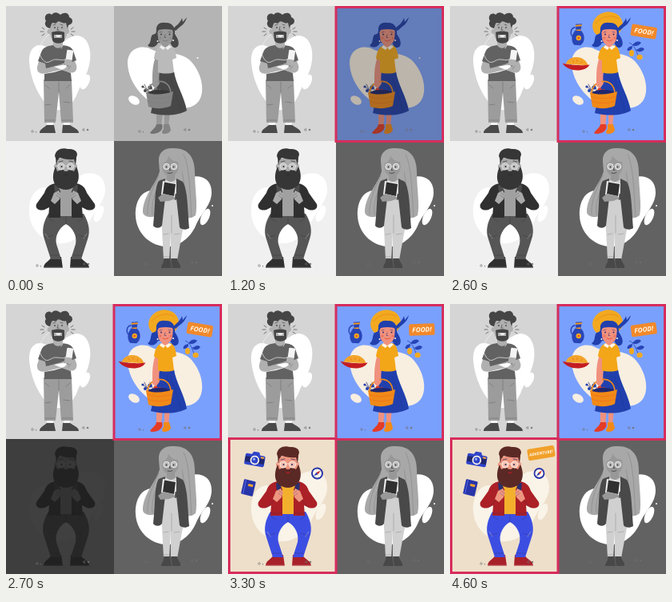
These frames come from a looping animation (270 px wide and 338 px high, 4.7 s). An HTML page:

```html
<!DOCTYPE html>
<html lang="en">
<head>
<meta charset="utf-8">
<title>Personas</title>
<style>
html,body{margin:0;width:100%;height:100%;overflow:hidden;background:#aaa}
svg{display:block;width:100vw;height:100vh}
.bg{fill:var(--bg)}.blob{fill:var(--blob)}.sk{fill:var(--sk)}.hr{fill:var(--hr)}
.sh{fill:var(--sh)}.bk{fill:var(--bk)}.so{fill:var(--so)}.jk{fill:var(--jk)}
.pt{fill:var(--pt)}.st{fill:var(--st)}.ck{fill:var(--ck)}.dk{fill:var(--dk)}.wh{fill:var(--wh)}
.l{fill:none;stroke:var(--dk);stroke-width:.7;stroke-linecap:round;stroke-linejoin:round}
.lb{stroke:var(--bk)}.lw{stroke:var(--wh)}.lo{stroke:var(--so)}
.tag{font-family:"Noto Sans","Open Sans",sans-serif;font-weight:600;font-style:italic;fill:#fff8ea;text-anchor:middle}
</style>
</head>
<body>
<svg viewBox="0 0 270 338" preserveAspectRatio="none">
<defs>
 <g id="splash">
  <path d="M0 50C-1 31 8 17 22 18C38 20 50 12 62 4C76-4 95 0 95 20C95 36 83 45 76 60C69 78 52 90 36 88C16 86 1 70 0 50Z"/>
  <ellipse cx="87" cy="51" rx="5" ry="11" transform="rotate(24 87 51)"/>
 </g>
</defs>

<!-- music fan -->
<g id="music">
 <path class="bg" d="M0 0H135V169H0Z"/>
 <path class="blob" d="M29 70C28 53 38 45 50 51C66 59 72 38 89 37C104 38 108 58 104 74C100 90 94 98 90 107C84 124 74 132 62 130C45 124 31 96 29 70Z"/>
 <ellipse class="blob" cx="99" cy="95" rx="5" ry="10" transform="rotate(25 99 95)"/>
 <path class="wh" d="M51 144H59V152H51ZM72 144H80V152H72Z"/>
 <path class="ck" d="M47 92H82L84 146H69L66 108L62 146H48Z"/>
 <path class="l" d="M66 95V108M49 99L54 103M80 99L75 103M49 124L56 123M72 120L80 121M49 143H61M70 143H83" opacity=".5"/>
 <path class="dk" d="M42 159C42 154 47 153 51 149H60L62 159ZM91 159C91 154 85 153 80 149H71L70 159Z"/>
 <path class="sk" d="M59 40H71V52C67 56 62 56 59 52Z"/>
 <path class="sk" d="M42 66L39 76C38 84 44 86 51 84L72 79C77 77 77 72 73 73L53 77L50 69ZM85 66L88 74C90 82 84 85 78 83L60 76C56 73 59 69 63 70L79 75Z"/>
 <path class="jk" d="M59 49C51 50 46 52 44 58L40 69L49 72L50 78L72 72L78 76L80 71L88 68L84 56C82 51 77 50 71 49C68 54 62 54 59 49ZM48 85L60 83L70 80L81 84L82 94H48Z"/>
 <path class="sk" d="M72 74L74 66L79 63L83 67L81 75Z"/>
 <path class="l" d="M53 77L73 73M81 75L78 79" opacity=".5"/>
 <rect class="wh" x="75.5" y="55" width="8" height="12" rx="1.2" transform="rotate(8 79 61)"/>
 <path class="l lw" d="M54 35C41 47 39 57 45 66C52 76 56 66 63 67C69 67 71 69 76 66M76 35C76 44 72 47 69 53"/>
 <path class="sk" d="M55 20H76V36C75 43 71 45 66 45C59 45 56 41 55 35C51 36 50 28 55 29ZM76 28C80 28 80 35 76 35Z"/>
 <path class="hr" d="M55 28C48 27 48 20 50 19C46 12 53 7 57 11C61 6 66 9 68 11C73 7 79 9 79 14C85 16 84 23 78 24L77 29L75 21C71 23 68 18 64 20C62 24 59 19 57 22Z"/>
 <path class="hr" fill-rule="evenodd" d="M57 33C62 31 69 31 73 33V43C71 48 60 48 58 43ZM60 36V40H70V36Z"/>
 <path class="wh" d="M62 36.5H69Q68 39 65.5 39Q63 39 62 36.5Z"/>
 <path class="l" d="M59 24L62 23M68 23L71 24M65 26L64 30H66"/>
 <g class="dk"><circle cx="61" cy="27" r=".9"/><circle cx="70" cy="27" r=".9"/></g>
 <path class="l" d="M48 29L45 27M47 32L43 32M48 35L45 37M81 29L84 27M82 32L86 32M81 35L84 37"/>
</g>

<!-- food lover -->
<g id="food">
 <path class="bg" d="M135 0H270V169H135Z"/>
 <path class="blob" d="M152 72C152 53 169 48 181 54C195 62 215 55 230 68C244 82 250 106 241 119C231 132 215 127 200 127C176 124 153 98 152 72Z"/>
 <ellipse class="blob" cx="160" cy="118" rx="7.5" ry="5" transform="rotate(32 160 118)"/>
 <circle class="blob" cx="239.5" cy="65" r="1"/>
 <g id="hat"><ellipse rx="19" ry="16.5" transform="rotate(-14)" fill="#f3a91f"/><path d="M-15-2C-9-11 6-14 14-8" stroke="#e28a1b" fill="none" stroke-width=".8"/></g>
 <path class="hr" d="M188 31C187 23 193 20 199 21C207 20 212 26 211 35C215 41 217 46 215 50C212 54 207 52 206 47L190 46C188 51 181 54 177 49C182 47 180 39 183 36C186 35 188 35 188 31Z"/>
 <path class="hr" d="M209 29C212 24 217 23 220 15L221 20L226 14C224 23 218 25 212 31Z"/>
 <path class="sk" d="M188 132L196 131L194 152H188ZM198 132H205L203 151H198Z"/>
 <path class="so" d="M180 159C183 154 187 153 188 148H195C197 153 194 157 189 159Q182 161 180 159Z"/>
 <path class="bk" d="M197 148H204L206 155Q205 160 197 160Q193 159 197 154Z"/>
 <path class="hr" d="M190 82H210C212 97 224 116 226 131C217 136 201 139 181 134C185 119 185 98 190 82Z"/>
 <path class="l" d="M206 91C209 106 217 119 218 132M201 90L203 105" opacity=".3"/>
 <path class="sk" d="M188 62C183 72 183 84 183 95L187 104L192 97C190 88 193 78 195 67Z"/>
 <path class="sh" d="M195 49H205C210 50 212 56 213 65L208 67L210 83C204 85 196 85 190 83V68L185 66C186 58 188 51 195 49Z"/>
 <path class="sk" d="M195 44H203V50Q199 54 195 50Z"/>
 <path class="wh" d="M194 49L199 52L197 55L192 52ZM204 49L199 52L202 55L207 51Z"/>
 <path class="sk" d="M189 30C194 25 204 25 209 30L208 41C207 47 203 49 199 49C194 49 190 45 190 39Z"/>
 <path class="hr" d="M188 35C187 27 191 22 199 23C207 22 211 27 210 36L208 30Q199 28 191 30Z"/>
 <path class="l" d="M199 36L198 39.5H200M192 33L195 32.3M203 32.3L206 33" opacity=".7"/>
 <g id="eyes" class="dk"><circle cx="-5" r=".9"/><circle cx="5.5" r=".9"/></g>
 <path id="smile" class="l lo"/>
 <g class="so" opacity=".35"><circle cx="193" cy="40" r="1.6"/><circle cx="206" cy="40" r="1.6"/></g>
 <g class="wh"><circle cx="189.5" cy="44" r="1"/><circle cx="209" cy="43" r="1"/></g>
 <path class="l" d="M181 108L171 101M178 108L173 98M184 107L180 98M202 107L205 100"/>
 <g class="hr"><circle cx="171" cy="101" r="1.6"/><circle cx="174" cy="106" r="2"/><circle cx="180" cy="102" r="2.6"/><circle cx="197" cy="103" r="3.4"/><circle cx="204" cy="104" r="2.4"/></g>
 <g class="so"><circle cx="187" cy="105" r="2.6"/><circle cx="192" cy="106" r="2"/></g>
 <path class="dk" d="M175 109Q190 101 207 108L205 111H177Z"/>
 <path class="l lb" style="stroke-width:1.6" d="M177 109C178 91 205 88 206 109"/>
 <path class="bk" d="M175 108C185 112 198 111 209 107L206 125C198 129 186 129 178 126Z"/>
 <path class="l lo" opacity=".35" d="M176 113C186 117 198 116 208 113M177 119C187 123 198 122 207 119"/>
 <path class="sk" d="M183 94L189 93L191 98L187 103L183 100Z"/>
 <g id="jug">
  <path d="M-4-9C-11-8-10 3-5 3" fill="none" stroke="#2845b7" stroke-width="1.5"/>
  <path fill="#2845b7" d="M-4-13L4-14L3-6C9-1 10 8 4 13H-4C-9 8-8-1-3-6Z"/>
  <path fill="#f39a20" d="M-4-12L4-13V-11L-4-10ZM-3-6L3-7V-5H-3Z"/>
  <circle cx="1" cy="4" r="3.2" fill="#f3a91f"/><circle cx="1" cy="4" r="1.2" fill="#e54a30"/>
 </g>
 <g id="pie">
  <path fill="#f3a42a" d="M-13 1C-11-6-5-9 1-9C8-9 13-5 15 0Z"/>
  <path fill="#c41d22" d="M-17 0C-8 2 9 1 17-1C13 9-9 11-17 0Z"/>
  <path d="M-5-5L-3-2M1-6V-3M7-5L6-2" fill="none" stroke="#e98320"/>
 </g>
 <g id="fruit">
  <path d="M-8-10C-2-8 1 0 4 9M-4-7L4-9M0-1L9-3" stroke="#2845b7" fill="none" stroke-width=".8"/>
  <path fill="#2845b7" d="M-4-7C0-13 5-12 7-10C4-6 0-5-4-7ZM1 0C5-5 9-5 11-2C8 2 5 2 1 0ZM-4-6C-10-5-11-2-10 0C-6 0-4-2-4-6Z"/>
  <g fill="#f3a91f"><ellipse cx="-5" cy="3" rx="3" ry="4"/><ellipse cx="5" cy="8" rx="3.6" ry="3.2"/></g>
 </g>
 <g id="foodTag">
  <rect x="-16" y="-7.3" width="32" height="14.6" rx="2" fill="#f1892a"/>
  <text class="tag" y="2.9" font-size="8.2">FOOD!</text>
 </g>
</g>

<!-- traveller -->
<g id="trip">
 <path class="bg" d="M0 169H135V338H0Z"/>
 <use href="#splash" class="blob" x="29" y="209"/>
 <path class="so" d="M47 328C47 321 54 320 57 314H69L71 328ZM104 328C104 321 96 320 93 314H81L80 328Z"/>
 <path class="wh" d="M47 326.8H71V328H47ZM80 326.8H104V328H80Z" opacity=".4"/>
 <path class="pt" d="M53 260H97C103 270 106 281 102 292L94 317H81L87 298C89 288 84 278 75 273C66 278 61 288 63 298L69 317H56L48 292C44 281 47 270 53 260Z"/>
 <path class="l" d="M75 264V273M54 266L60 270M96 266L90 270M50 290L59 287M91 287L100 290M56 312H67M83 312H94" opacity=".45"/>
 <path class="l lw" d="M49 285L53 291M101 285L97 291" opacity=".5"/>
 <path class="sh" d="M64 224H86V263H64Z"/>
 <path class="jk" d="M63 222C53 223 50 228 48 234L38 248C36 254 42 257 48 255L54 252L53 265H68V232ZM87 222C96 223 99 228 101 234L111 248C113 254 107 257 101 255L95 252L96 265H82V232Z"/>
 <path class="st" d="M60 224H66L67 242H62ZM84 224H90L88 242H83Z"/>
 <path class="l" d="M48 255L60 243M101 255L90 243M54 262H67M83 262H95" opacity=".4"/>
 <path class="sk" d="M56 244L60 234L66 231L69 236L67 242L61 248ZM94 244L90 234L84 231L81 236L83 242L89 248Z"/>
 <path class="l" d="M64 234L68 237M63 237L67 240M86 234L82 237M87 237L83 240" opacity=".4"/>
 <path class="sk" d="M63 191H86V205C90 203 90 197 86 198V213H63V205C59 204 59 197 63 198Z"/>
 <path class="hr" d="M63 200C62 195 63 191 61 188C62 179 71 177 77 179C87 178 91 184 88 189C88 193 87 197 87 200L85 192C78 193 72 191 67 190L64 194Z"/>
 <path class="hr" d="M62 201L64 207C70 204 80 204 85 207L88 201C94 214 91 229 75 230C58 229 56 214 62 201Z"/>
 <path class="so" d="M72 211Q75 209.5 78 211Q75 213.5 72 211Z"/>
 <path class="sk" d="M73 200H77L78 206Q75 208 72 206Z"/>
 <g class="wh" fill-opacity=".45" style="stroke:var(--wh)"><circle cx="69" cy="201" r="4"/><circle cx="80.5" cy="201" r="4"/></g>
 <path class="l lw" d="M73 200H76.5M65 200H62M84.5 200H87"/>
 <path class="l" d="M66 195L71 194M79 194L84 195"/>
 <g class="dk"><circle cx="69.5" cy="201" r="1"/><circle cx="80" cy="201" r="1"/></g>
 <g id="camera">
  <rect x="-12.5" y="-6.5" width="25" height="14" rx="2" fill="#2f43c9"/>
  <path fill="#2f43c9" d="M-5-6L-3-10H4L6-6Z"/><path fill="#20276f" d="M-12-3H12V4H-12Z"/>
  <circle r="5.8" cy=".5" fill="#f8f2e6"/><circle r="4" cy=".5" fill="#2f43c9"/><circle r="1.5" cx="-1" cy="-.5" fill="#9eb4ff"/>
  <path fill="#f5a52e" d="M7-5H11V-3H7Z"/>
 </g>
 <g id="book">
  <rect x="-7.5" y="-9.5" width="15" height="19" rx="1.3" fill="#2735a9"/>
  <path d="M-5-9V9" stroke="#5668ea"/><path fill="#f5a52e" d="M-1-5H5V-2H-1Z"/>
 </g>
 <g id="compass">
  <circle r="6" fill="#faf5ec" stroke="#2735a9" stroke-width="1.8"/>
  <path fill="#c92b30" d="M3.5-3.5L1 1L-1-1Z"/><path fill="#2735a9" d="M-3.5 3.5L1 1L-1-1Z"/>
 </g>
 <g id="tripTag">
  <rect x="-17" y="-7.2" width="34" height="14.4" rx="2.4" fill="#f1a02a"/>
  <text class="tag" y="1.9" font-size="5.1">ADVENTURE!</text>
 </g>
</g>

<!-- reader -->
<g id="reader">
 <path class="bg" d="M135 169H270V338H135Z"/>
 <use href="#splash" class="blob" x="162" y="213"/>
 <circle class="blob" cx="258" cy="250" r="1"/>
 <path class="hr" d="M191 195C190 183 198 177 210 178C228 178 236 190 236 208C236 228 240 250 237 262C230 268 219 266 214 258L194 256C189 267 172 266 171 258C171 238 188 222 192 207Z"/>
 <path class="l" d="M191 212C184 227 176 243 177 261M194 217C187 232 181 246 183 261M222 186C230 200 230 240 232 264M217 195C224 220 225 245 225 264" opacity=".25"/>
 <path class="pt" d="M195 244H219L221 280L214 318H206V284L204 318H197L195 280Z"/>
 <path class="l" d="M207 262V284M197 286L203 285M210 286L217 285M197 314H204" opacity=".3"/>
 <path class="so" d="M197 316H205L207 328H194C194 324 198 322 197 316ZM206 316H214C214 321 219 323 218 328H208Z"/>
 <path class="pt" d="M198 218H216V248H196Z"/>
 <path class="jk" d="M199 216L191 219C185 228 187 251 184 275C187 279 193 278 195 275L199 240L198 228ZM213 216L221 220C227 230 227 252 229 278C225 281 219 280 217 277L213 241Z"/>
 <path class="sk" d="M201 207H211V218Q206 222 201 218Z"/>
 <path class="sk" d="M195 193C200 186 211 186 217 193L215 206C212 212 209 213 205 213C199 213 195 207 195 200Z"/>
 <path class="hr" d="M194 203C189 192 195 183 205 183C216 182 223 192 220 210L216 204L215 195C209 195 205 191 203 187C203 192 199 196 196 197Z"/>
 <g class="wh" fill-opacity=".35" style="stroke:var(--wh)"><circle cx="200.5" cy="201" r="3.7"/><circle cx="210" cy="201" r="3.7"/></g>
 <path class="l" d="M205 203L204.3 205.5H206M202 209Q205 210.5 208 208.5"/>
 <g class="dk"><circle cx="200.5" cy="201.5" r=".9"/><circle cx="209.5" cy="201.5" r=".9"/></g>
 <path class="jk" d="M226 237L211 243L209 237L219 231Z"/>
 <path class="wh" d="M196 219L213 222L211 240L194 236Z"/><path class="dk" d="M198 220.5L212 223L210 238L196 235Z"/>
 <path class="sk" d="M190 240L196 235L209 238L212 241L204 244L193 245Z"/>
</g>

<g id="marks" fill="#707070" stroke="#707070" stroke-width=".6"></g>
<g fill="none" stroke="#d62d5d" stroke-width="3">
 <rect id="foodBox" x="135" y="1.5" width="133.5" height="168"/>
 <rect id="tripBox" x="1.5" y="168.5" width="133.5" height="168"/>
</g>
</svg>
<script>
const LOOP = 4700, STEP = 100;
const $ = id => document.getElementById(id);
const clamp = x => Math.max(0, Math.min(1, x));

// one grey level per role, with the lit colour where the panel lights up
const looks = {
  music: {bg:[0xd5], blob:[255], sk:[0xb0], hr:[0x45], jk:[0x62], ck:[0x9c], dk:[0x4a], wh:[0xf4]},
  reader: {bg:[0x62], blob:[255], sk:[0x98], hr:[0xa8], jk:[0x49], pt:[0xd0], so:[0x48], dk:[0x30], wh:[0xf0]},
  food: {bg:[0xb4,'7aa0fd'], blob:[255,'f8efe1'], sk:[0x98,'f0917e'], hr:[0x48,'2140ad'], sh:[0xba,'f3a617'],
    bk:[0x84,'f18a18'], so:[0x72,'e43c26'], dk:[0x38,'20276f'], wh:[0xee,'fff6e8']},
  trip: {bg:[0xf0,'eedfca'], blob:[255,'f9f3e8'], sk:[0xaa,'ee9680'], hr:[0x36,'5b2925'], jk:[0x30,'ab2026'],
    sh:[0xa0,'f3b02d'], pt:[0x56,'3c4ee2'], so:[0x30,'a82029'], st:[0x4c,'2a306f'], dk:[0x2c,'2a235c'], wh:[0xe2,'f8f2e6']}
};
const rgb = hex => [0, 2, 4].map(i => parseInt(hex.slice(i, i + 2), 16));

// k < 0: grey; 0..1: from the dark flash up to full colour
function paint(id, k) {
  for (const [name, [grey, lit]] of Object.entries(looks[id])) {
    const dark = 26 + grey * .15;
    const c = k < 0 ? [grey, grey, grey] : rgb(lit).map(v => Math.round(dark + (v - dark) * k));
    $(id).style.setProperty('--' + name, `rgb(${c})`);
  }
}

function pop(t, start, span = 200) {
  const u = clamp((t - start) / span) - 1;
  return t < start ? 0 : 1 + 2.7 * u ** 3 + 1.7 * u ** 2;
}
function place(id, x, y, turn, size) {
  $(id).setAttribute('transform', `translate(${x} ${y}) rotate(${turn}) scale(${Math.max(0, size)})`);
}
const swing = (t, from, size) => t < from ? 0 :
  size * clamp(1 - (t - from) / 500) * Math.cos((t - from) / 85);

function draw(ms) {
  const t = Math.floor(ms / STEP) * STEP;
  paint('food', t < 1000 ? -1 : clamp((t - 1000) / 300));
  paint('trip', t < 2700 ? -1 : clamp((t - 2700) / 200));
  $('foodBox').style.opacity = clamp((t - 1000) / 200);
  $('tripBox').style.opacity = clamp((t - 2700) / 200);

  place('hat', 197, 24, 0, pop(t, 1400));
  place('jug', 160, 36, 4 + swing(t, 1700, 3), pop(t, 1500));
  place('pie', 157.5, 73, 5 + swing(t, 1700, 2), pop(t, 1500));
  place('fruit', 232, 56, swing(t, 1700, 3), pop(t, 1500));
  const tilt = 9 - 17 * clamp((t - 3100) / 300);
  place('foodTag', 242.3, 32, tilt + swing(t, 3700, 1.5), pop(t, 2400));

  place('camera', 33.5, 195, 10, pop(t, 3000));
  place('book', 25.5, 230, 13, pop(t, 3100));
  place('compass', 111.5, 212, swing(t, 3300, 8), pop(t, 3200));
  place('tripTag', 114, 186.5, -9 + swing(t, 3700, 2), pop(t, 3400));

  const shut = t === 4400 ? .15 : t === 4300 || t === 4500 ? .55 : 1;
  $('eyes').setAttribute('transform', `translate(199 35.5) scale(1 ${shut})`);
  $('smile').setAttribute('d', `M196 43Q199 ${t === 2200 ? 47 : 45.5} 203 42.5`);
}

// small floor doodles: ring and dot, triangle and dot
$('marks').innerHTML = [[33, 157, 63], [167, 157, 56], [39, 325, 58], [175, 323, 57]].map(([x, y, d]) =>
  `<circle cx="${x}" cy="${y}" r="1.3" fill="none"/><circle cx="${x + 4.5}" cy="${y + .8}" r=".4"/>
   <path d="M${x + d - 1} ${y - 2}l2.6-1.6l.2 3z" fill="none"/><circle cx="${x + d + 6}" cy="${y - 2}" r=".9"/>`).join('');

paint('music', -1);
paint('reader', -1);
const begin = performance.now();
function tick() {
  draw((performance.now() - begin) % LOOP);
  requestAnimationFrame(tick);
}
tick();
</script>
</body>
</html>
```
